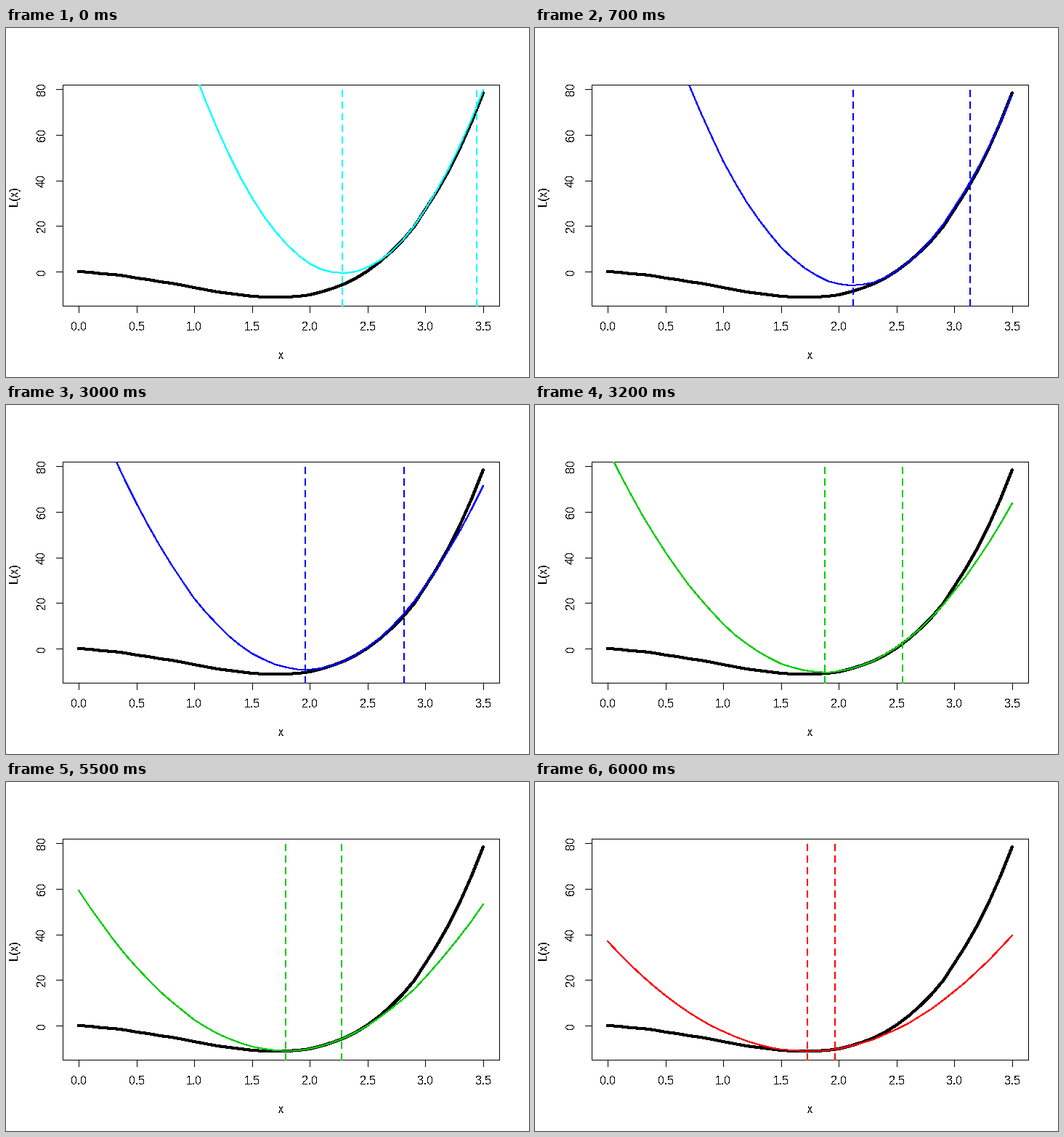
A matplotlib script that plays this animation: 720 by 480 pixels, repeating every 8000 ms.

```python
import numpy as np
import matplotlib.pyplot as plt
from matplotlib.animation import FuncAnimation
from matplotlib.patches import Rectangle

plt.rcParams.update({
    "font.family": "Liberation Sans",
    "text.antialiased": False,
    "text.hinting": "native",
    "text.hinting_factor": 1,
})

# Plot region in pixels, y pointing down
W, H = 720, 480
LEFT, RIGHT, TOP, BOTTOM = 78.72, 679.68, 78.72, 382.08
HOLD, MOVE = 19, 6
FIRST_MOVE = 5
CYCLE = HOLD + MOVE
COLORS = ["#00ffff", "#0000ff", "#00cd00", "#ff0000"]


def loss(x):
    return x**4 - 5 * x**2 - 3 * x


def grad(x):
    return 4 * x**3 - 10 * x - 3


def curvature(a, b):
    return (grad(a) - grad(b)) / (a - b)


def secant(a, b):
    return a - grad(a) / curvature(a, b)


def model(x, a, b):
    """Parabola touching the loss at b, with the secant slope of a and b."""
    d = x - b
    return loss(b) + grad(b) * d + curvature(a, b) / 2 * d**2


def ease(s):
    return 4 * s**3 if s < 0.5 else 1 - 4 * (1 - s)**3


xs = np.arange(36) / 10
ys = loss(xs)


def scale(v, lo, hi, start, end):
    pad = 0.04 * (hi - lo)
    return np.floor(start + (v - lo + pad) / (hi - lo + 2 * pad) * (end - start))


def px(x):
    return scale(x, xs.min(), xs.max(), LEFT, RIGHT)


def py(y):
    return scale(y, ys.min(), ys.max(), BOTTOM, TOP)


# Secant iterates; each state holds two points and the next estimate
pts = [3.442, 2.8265]
while len(pts) < 6:
    pts.append(secant(pts[-2], pts[-1]))
states = [np.array(pts[i:i + 3]) for i in range(4)]

fig = plt.figure(figsize=(W / 72, H / 72), dpi=72, facecolor="white")
ax = fig.add_axes([0, 0, 1, 1])
ax.set_xlim(0, W)
ax.set_ylim(H, 0)
ax.axis("off")


def line(x, y, width, **kw):
    return ax.plot(x, y, lw=width, color="black", **kw)[0]


def thin(x0, y0, x1, y1):
    # Snapping moves whole coordinates to pixel centres
    line([x0, x1], [y0, y1], 1, antialiased=False, snap=True,
         solid_capstyle="projecting")


def stroke(x, y, width):
    # Without antialiasing every touched pixel is filled, adding one to the width
    return line(x, y, width - 1, antialiased=False,
                solid_capstyle="round", solid_joinstyle="round")


def label(x, y, text, rotation=0, size=16):
    ax.text(x, y, text, rotation=rotation, rotation_mode="anchor",
            ha="left", va="baseline", size=size)


l, r, t, b = (int(v) for v in (LEFT, RIGHT, TOP, BOTTOM))
for seg in [(l, t, r, t), (l, b, r, b), (l, t, l, b), (r, t, r, b)]:
    thin(*seg)

for v in np.arange(0, 3.6, 0.5):
    thin(px(v), b, px(v), b + 9)
    label(px(v) - 11, 416, f"{v:.1f}")
for v in range(0, 81, 20):
    text = str(v)
    thin(l - 9, py(v), l, py(v))
    label(54, py(v) + 4.5 * len(text), text, 90)
label(375, 455, "x", size=17)
label(16, 245, "L(x)", 90, 17)

stroke(px(xs), py(ys), 4)
curve = stroke([], [], 2)
curve.set_clip_path(Rectangle((l, t), r + 1 - l, b + 1 - t, transform=ax.transData))
marks = [line([], [], 2, linestyle=(0, (5, 3)), dash_capstyle="butt")
         for _ in range(2)]


def draw(i):
    k, n = divmod(i - FIRST_MOVE, CYCLE)
    s = min((n + 1) / MOVE, 1)
    start, end = states[k], states[k + 1]
    p, q, est = start + (end - start) * ease(s)
    color = COLORS[k if s < 0.5 else k + 1]

    curve.set_data(px(xs), py(model(xs, p, q)))
    for mark, x in zip(marks, (p, est)):
        mark.set_data([px(x)] * 2, [85, 383])
    for art in (curve, *marks):
        art.set_color(color)
    return [curve, *marks]


anim = FuncAnimation(fig, draw, frames=80, interval=100, repeat=True,
                     repeat_delay=0, blit=False)
plt.show()
```
